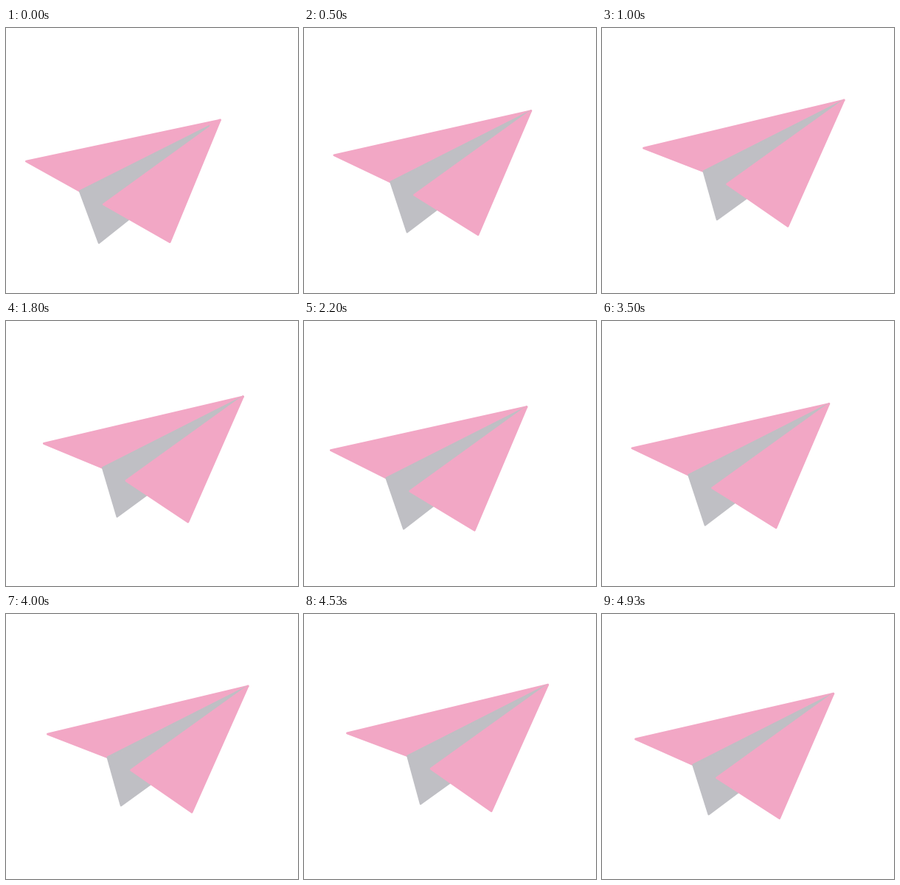
These frames come from a looping animation (396 by 360 pixels, 5000 ms). An HTML page:

```html
<!DOCTYPE html>
<html lang="en">
<head>
<meta charset="utf-8">
<title>Paper plane</title>
<style>
  html, body { margin: 0; width: 100%; height: 100%; overflow: hidden; background: #fff; }
  svg { display: block; width: 396px; height: 360px; }
  path { stroke-linejoin: round; }
  .wing { fill: #f2a7c5; stroke: #f2a7c5; stroke-width: 2.8; }
  .keel { fill: #bfbfc4; stroke: #bfbfc4; stroke-width: 2.4; }
</style>
</head>
<body>
<svg viewBox="0 0 396 360">
  <path id="far" class="wing"/>
  <path id="keel" class="keel"/>
  <path id="near" class="wing"/>
</svg>
<script>
const LOOP = 5000, CYCLE = 3000, RISE = 1325, FALL_AT = 1438;

// Resting position followed by the offset at the top of the flight.
const points = {
  left: [27.4, 181.1, 32, -19.7],
  nose: [290.4, 125, 41.5, -29.7],
  fold: [100, 221.6, 41.5, -29.7],
  inner: [132.3, 239.6, 41, -30.2],
  right: [222.1, 290.9, 33, -23.8],
  bottom: [126, 292, 33, -35],
  knee: [175, 253, 33, -31]
};

const bezier = (s, a, b) => 3 * (1 - s) ** 2 * s * a + 3 * (1 - s) * s * s * b + s ** 3;

function ease(x) {
  if (x <= 0) return 0;
  if (x >= 1) return 1;
  let lo = 0, hi = 1;
  for (let i = 0; i < 24; i++) {
    const mid = (lo + hi) / 2;
    if (bezier(mid, 0.283, 0.52) < x) lo = mid; else hi = mid;
  }
  return bezier(lo, 0, 1);
}

// Two pictures per 100 ms, held for 30 and 70 ms.
const hold = t => Math.floor(t / 100) * 100 + (t % 100 >= 30 ? 50 : 0);

const lift = t => ease(t / RISE) - ease((t - FALL_AT) / RISE);

const at = (name, p) => {
  const [x, y, dx, dy] = points[name];
  return [x + dx * p, y + dy * p];
};

const draw = (id, list) =>
  document.getElementById(id).setAttribute('d', 'M' + list.map(q => q.map(v => v.toFixed(2))).join('L') + 'Z');

function render(now) {
  const p = lift(hold(now % LOOP) % CYCLE);
  const pose = names => names.split(' ').map(n => at(n, p));
  const [nx, ny] = at('nose', p);
  const gap = Math.max(0, 1 - p * 6);   // the wings close over the keel at rest
  draw('far', pose('left nose fold'));
  draw('keel', [[nx - 15 * gap, ny + 8.3 * gap], ...pose('fold bottom knee')]);
  draw('near', pose('nose inner right'));
}

let start;
function tick(now) {
  start ??= now;
  render(now - start);
  requestAnimationFrame(tick);
}
render(0);
requestAnimationFrame(tick);
</script>
</body>
</html>
```
